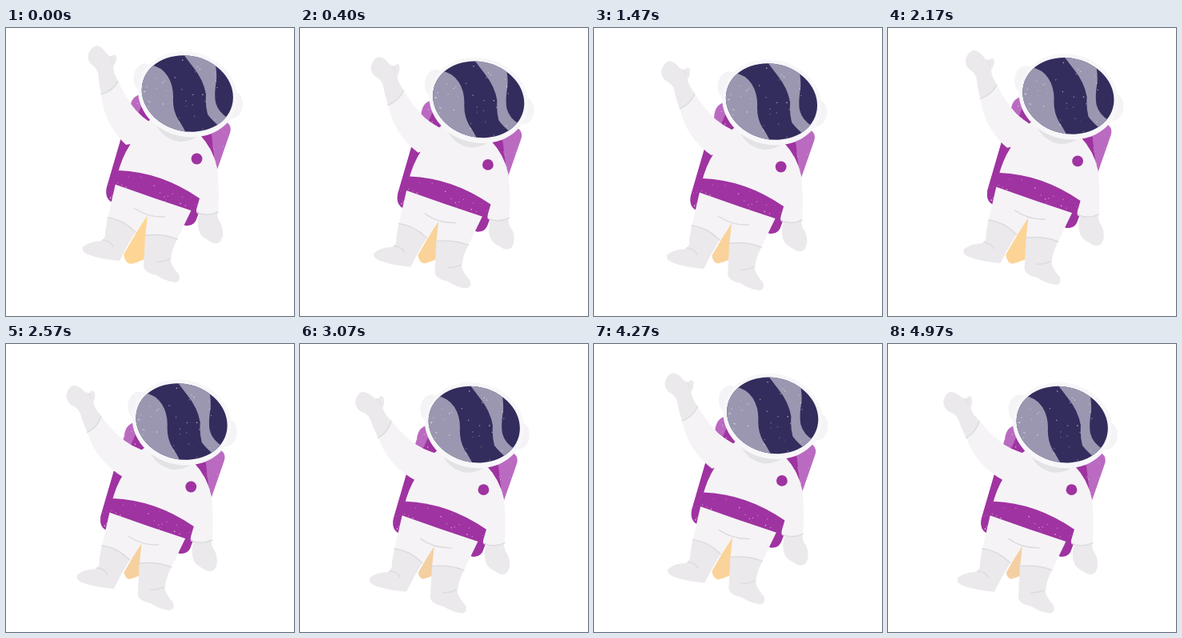
Animation, 360 px wide and 360 px high, one loop 5070 ms. Source, as an HTML page with a canvas:

```html
<!DOCTYPE html>
<html lang="en">
<head>
<meta charset="utf-8">
<title>Waving astronaut</title>
<style>
html, body { margin: 0; width: 100%; height: 100%; overflow: hidden; background: #fff; }
canvas { display: block; width: 360px; height: 360px; }
</style>
</head>
<body>
<canvas id="stage" width="360" height="360"></canvas>
<script>
const ctx = document.getElementById('stage').getContext('2d');
const LOOP = 5070;
const SUIT = '#f5f3f6', GLOVE = '#ebe9ec', SEAM = '#dcdbde';
const PURPLE = '#9f33a1', LILAC = '#bb6ac1', NAVY = '#332d5d', GLARE = '#9b97b1';

const path = d => new Path2D(d);
const shape = {
  pack: path('M171 83 L268 114 Q284 119 280 131 L264 177 L239 236 Q236 248 225 247 L133 218 Q123 213 126 199 L155 100 Q157 83 171 83Z'),
  packLow: path('M146 122 L164 110 L172 91 L185 112 L240 128 L257 133 L262 176 L239 236 Q236 248 225 247 L133 218 Q123 213 126 199 L149 120Z'),
  flame: path('M177 233 Q161 258 147 283 Q149 294 156 295 Q165 293 173 289Z'),
  legs: path('M138 190 L127 238 Q143 242 162 256 L177 234 L174 260 Q195 258 214 264 L232 227 L238 205Z'),
  leftBoot: path('M127 237 Q146 239 162 255 Q151 272 142 291 Q118 289 102 283 Q94 279 96 274 Q103 267 119 266 Q125 263 124 254Z'),
  rightBoot: path('M174 259 Q196 257 214 264 Q206 279 206 292 Q208 299 216 308 Q219 316 212 318 Q200 317 188 309 Q173 306 172 298Z'),
  torso: path('M181 114 Q166 125 155 146 Q144 163 139 185 L137 195 Q180 205 238 225 L238 230 Q253 236 265 230 Q267 201 264 175 Q259 151 242 133Z'),
  belt: path('M141 178 Q194 180 242 213 L237 230 Q185 213 135 195 Q136 185 141 178Z'),
  hand: path('M242 232 Q255 236 264 230 Q264 239 269 245 Q274 258 268 267 Q261 272 254 266 Q243 261 241 253 Q238 244 242 232Z'),
  neck: path('M187 119 Q216 140 242 133 Q233 142 216 142 Q195 138 187 119Z'),
  arm: path('M119 83 Q121 105 131 122 Q140 137 150 146 L173 142 L190 124 Q167 111 157 96 Q147 82 140 66Z'),
  glove: path('M119 83 Q116 70 115 56 Q113 50 106 45 Q101 39 103 32 Q107 23 114 22 Q121 24 125 31 Q129 36 132 35 Q136 32 138 35 Q139 42 134 48 Q134 56 140 66 Q134 79 119 83Z'),
  bandLeft: path('M160 46 L180 46 Q194 48 202 60 Q209 71 209 86 Q208 102 215 114 Q220 121 226 133 L160 140Z'),
  bandRight: path('M221 32 L234 49 Q247 65 250 83 Q249 97 252 108 Q258 116 268 124 L278 113 Q265 105 262 93 Q260 83 263 65 Q264 50 259 34Z')
};

function ellipsePath(x, y, rx, ry, angle) {
  const p = new Path2D();
  p.ellipse(x, y, rx, ry, angle, 0, Math.PI * 2);
  return p;
}
const helmet = ellipsePath(227, 83, 62.5, 53, 0.25);
const visor = ellipsePath(226.8, 82, 57.7, 47.1, 0.25);
const earLeft = ellipsePath(173, 62, 13.5, 17.5, 0.1);
const earRight = ellipsePath(283, 96, 13, 17, 0.1);

function fill(p, color) {
  ctx.fillStyle = color;
  ctx.fill(p);
}

function seam(d, color = SEAM) {
  ctx.strokeStyle = color;
  ctx.lineWidth = 1.5;
  ctx.lineCap = 'round';
  ctx.stroke(path(d));
}

function random(seed) {
  return () => (seed = seed * 16807 % 2147483647) / 2147483647;
}

function speckle(clip, count, x, y, w, h, seed) {
  const rnd = random(seed);
  ctx.save();
  ctx.clip(clip);
  for (let i = 0; i < count; i++) {
    const px = x + w * rnd(), py = y + h * rnd(), r = 0.35 + 0.45 * rnd();
    ctx.globalAlpha = 0.3 + 0.5 * rnd();
    fill(ellipsePath(px, py, r, r, 0), '#fff');
  }
  ctx.restore();
}

function pivot(x, y, transform) {
  ctx.save();
  ctx.translate(x, y);
  transform();
  ctx.translate(-x, -y);
}

function drawPack(sway) {
  fill(shape.pack, LILAC);
  fill(shape.packLow, PURPLE);
  speckle(shape.pack, 16, 152, 82, 28, 34, 812);
  speckle(shape.pack, 18, 254, 118, 26, 50, 77);
  speckle(shape.pack, 14, 124, 180, 20, 38, 4021);
  const size = 1 - 0.35 * sway;
  pivot(177, 234, () => ctx.scale(size, size));
  fill(shape.flame, `rgb(${254 - 11 * sway},${213 - 6 * sway},${148 + 15 * sway})`);
  ctx.restore();
}

function drawBody() {
  fill(shape.legs, SUIT);
  fill(shape.leftBoot, GLOVE);
  fill(shape.rightBoot, GLOVE);
  seam('M127 237 Q146 239 162 255');
  seam('M174 259 Q196 257 214 264');
  seam('M121 265 Q131 266 134 273');
  seam('M188 292 Q196 293 204 289');
  seam('M160 225 Q177 237 198 236');
  fill(shape.torso, SUIT);
  fill(shape.hand, GLOVE);
  seam('M239 231 Q253 236 265 230');
  fill(shape.belt, PURPLE);
  speckle(shape.belt, 45, 136, 178, 106, 51, 1931);
  fill(ellipsePath(238.5, 163.5, 6.9, 6.9, 0), PURPLE);
}

function drawArm(sway) {
  pivot(173, 137, () => ctx.rotate(-16 * Math.PI / 180 * sway));
  fill(shape.arm, SUIT);
  fill(shape.glove, GLOVE);
  seam('M119 83 Q133 79 140 67');
  seam('M130 36 Q133 39 132 43', '#e3e2e5');
  ctx.restore();
}

function drawHead() {
  fill(shape.neck, '#e3e2e4');
  fill(earLeft, SUIT);
  fill(earRight, SUIT);
  fill(helmet, '#f7f6f8');
  fill(visor, NAVY);
  ctx.save();
  ctx.clip(visor);
  fill(shape.bandLeft, GLARE);
  fill(shape.bandRight, GLARE);
  ctx.restore();
  speckle(visor, 48, 172, 34, 110, 96, 551);
}

// Poses advance at 12.5 fps, shown on a 30 Hz clock.
function poseIndex(time) {
  const tick = Math.floor((time + 5) * 0.03);
  return Math.min(62, Math.floor(tick / 2.4 + 1e-6));
}

function draw(time) {
  const sway = (1 - Math.cos(poseIndex(time) * Math.PI / 12)) / 2;
  ctx.fillStyle = '#fff';
  ctx.fillRect(0, 0, 360, 360);
  ctx.save();
  ctx.translate(-9.7 * sway, 20 * sway);
  drawPack(sway);
  drawBody();
  drawArm(sway);
  drawHead();
  ctx.restore();
}

const start = performance.now();
function loop() {
  draw((performance.now() - start) % LOOP);
  requestAnimationFrame(loop);
}
loop();
</script>
</body>
</html>
```
